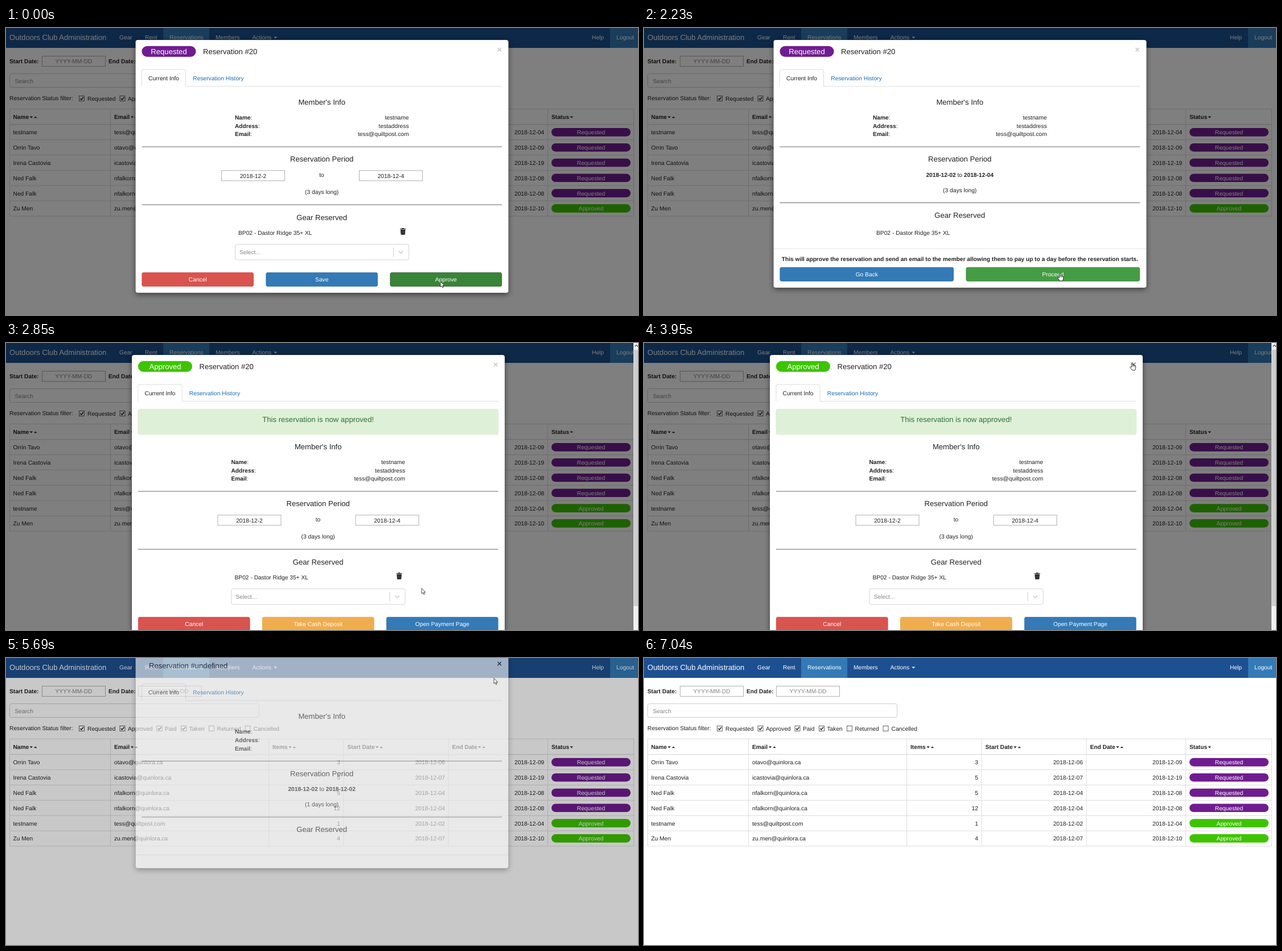
An HTML page that plays this animation: 1110x505 px, repeating every 7410 ms.

```html
<!DOCTYPE html>
<html lang="en">
<head>
<meta charset="utf-8">
<title>Reservations</title>
<style>
  html, body { margin: 0; width: 100%; height: 100%; overflow: hidden; background: #fff; }
  svg { display: block; width: 1110px; height: 505px; }
  text { font: 10.24px "Liberation Sans", Arial, sans-serif; fill: #222; text-rendering: geometricPrecision; white-space: pre; }
  .b { font-weight: 700; font-size: 10.2px; }
  .h { font-size: 13.1px; }
  .w { fill: #fff; }
  .mute { fill: #868686; }
  .link { fill: #1a6cb4; }
  .ok { fill: #2f7034; }
  .mid { text-anchor: middle; }
  .end { text-anchor: end; }
  .x { font-size: 15px; font-weight: 700; }
  .panel { fill: #fff; stroke: rgba(0,0,0,.2); stroke-width: .7; filter: drop-shadow(0 3.5px 5px rgba(0,0,0,.5)); }
</style>
</head>
<body>
<svg id="stage" viewBox="0 0 1110 505" xmlns="http://www.w3.org/2000/svg"></svg>
<script>
const LOOP = 7410;
const PURPLE = '#701c91', GREEN = '#3dc400', BLUE = '#337ab7', RED = '#d9534f', ORANGE = '#f0ad4e';

// drawing helpers
const text = (x, y, s, cls = '') => `<text x="${x}" y="${y}" class="${cls}">${s}</text>`;
const box = (x, y, w, h, fill, stroke = 'none', r = 0, more = '') =>
  `<rect x="${x}" y="${y}" width="${w}" height="${h}" rx="${r}" fill="${fill}" stroke="${stroke}" ${more}/>`;
const path = (d, fill, stroke = 'none', sw = 1) =>
  `<path d="${d}" fill="${fill}" stroke="${stroke}" stroke-width="${sw}"/>`;
const group = (id, body, attrs = '') => `<g id="${id}" ${attrs}>${body}</g>`;
const bold = s => `<tspan class="b">${s}</tspan>`;
const down = (x, y) => path(`M${x} ${y}h5.6l-2.8 2.9z`, '#222');
const up = (x, y) => path(`M${x} ${y + 2.9}h5.6l-2.8 -2.9z`, '#222');
const pill = (x, y, w, h, status, base, cls) =>
  box(x, y, w, h, status === 'Approved' ? GREEN : PURPLE, 'none', h / 2) +
  text(x + w / 2, base, status, `w mid ${cls}`);
const button = (x, y, w, label, fill, edge = fill, id = '') =>
  box(x + .4, y + .4, w - .8, 24.2, fill, edge, 2.8, `stroke-width=".8" ${id && `id="${id}"`}`) +
  text(x + w / 2, y + 16, label, 'w mid');

// page
function navbar() {
  const items = [[199, 'Gear'], [244, 'Rent'], [287, 'Reservations'], [368, 'Members'], [432.5, 'Actions'], [1029, 'Help'], [1072, 'Logout']];
  return box(0, 0, 1110, 35, '#1d5091') + box(276, 0, 81, 35, BLUE) + box(1061, 0, 49, 35, BLUE) +
    text(6, 21, 'Outdoors Club Administration', 'h w') +
    items.map(([x, s]) => text(x, 20, s, 'w')).join('') +
    path('M470.5 15.5h5.6l-2.8 2.9z', '#fff');
}

function filters() {
  const checks = [[128, 143, 'Requested'], [199.5, 214, 'Approved'], [264.5, 279, 'Paid'], [307, 321.5, 'Taken'], [356, 370.5, 'Returned'], [419.5, 434.5, 'Cancelled']];
  const date = (x, lx, label) => text(lx, 62, label, 'b') +
    box(x, 49.5, 111, 18, '#fff', '#b0b0b0') + text(x + 55.5, 62, 'YYYY-MM-DD', 'mute mid');
  return date(63.5, 6, 'Start Date:') + date(232.5, 180, 'End Date:') +
    box(6.5, 80.5, 438, 24, '#fff', '#ccc', 3) + text(15.5, 96.5, 'Search', 'mute') +
    text(6, 127, 'Reservation Status filter:') +
    checks.map(([x, lx, s], i) => box(x + .5, 119.5, 9, 9, '#fff', '#555', 0, 'stroke-width=".9"') +
      (i < 4 ? path(`M${x + 2.4} 124l2 2.2l3.6 -4.6`, 'none', '#111', 1.4) : '') + text(lx, 128, s)).join('');
}

function grid() {
  const heads = [[12.5, 'Name', 41.5], [190, 'Email', 218.8], [468, 'Items', 496.3], [599.5, 'Start Date', 649], [783.5, 'End Date', 829], [958, 'Status', 990.5]];
  let lines = '';
  for (const x of [6.5, 183.5, 461.5, 593, 777, 951.5, 1102.5]) lines += `M${x} 142.5V331`;
  for (let i = 0; i < 8; i++) lines += `M6.5 ${i ? 142.8 + 26.9 * i : 142.5}H1102.5`;
  return path(lines, 'none', '#ddd') + path('M6.5 169.6H1102.5', 'none', '#ddd', 1.4) +
    heads.map(([x, s, cx], i) => text(x, 160, s, 'b') + down(cx, 155.6) + (i < 5 ? up(cx + 7.4, 155.4) : '')).join('');
}

const guest = ['testname', 'tess@quiltpost.com', 1, '02', '04'];
const people = [
  ['Orrin Tavo', 'otavo@quinlora.ca', 3, '06', '09'],
  ['Irena Castovia', 'icastovia@quinlora.ca', 5, '07', '19'],
  ['Ned Falk', 'nfalkorn@quinlora.ca', 5, '04', '08'],
  ['Ned Falk', 'nfalkorn@quinlora.ca', 12, '04', '08'],
  ['Zu Men', 'zu.men@quinlora.ca', 4, '07', '10']
];
const rows = (list, requested) => list.map(([name, mail, n, from, to], i) => {
  const y = 187.3 + 26.8 * i;
  return text(12.5, y, name) + text(190, y, mail) + text(587, y, n, 'end') +
    text(771, y, '2018-12-' + from, 'end') + text(945.3, y, '2018-12-' + to, 'end') +
    pill(958, y - 11.2, 139, 14.6, i < requested ? 'Requested' : 'Approved', y, '');
}).join('');

// dialog
const rule = y => path(`M238.5 ${y}H871`, 'none', '#666');
const shell = (bottom, title, titleX, status) =>
  box(227.5, 21, 655, bottom - 21, '#fff', 'none', 4, 'class="panel"') +
  (status ? pill(238.5, 31.8, 95, 19, status, 45.8, 'h') : '') +
  text(titleX, 45.7, title, 'h') +
  path('M238.5 102.5V76q0 -3 3 -3h71q3 0 3 3V102.5H871', 'none', '#ddd') +
  text(250, 91.7, 'Current Info') + text(328.3, 91.7, 'Reservation History', 'link');
const closeX = fill => `<text x="866.6" y="43" class="x mid" style="fill:${fill}">×</text>`;
const member = values => text(554.7, 134.6, "Member's Info", 'h mid') +
  ['Name', 'Address', 'Email'].map((s, i) => text(402, 161 + 14.6 * i, bold(s) + ':') +
    text(707.5, 161 + 14.6 * i, values[i] || '', 'end')).join('') +
  rule(209) + text(554.7, 235.3, 'Reservation Period', 'h mid');
const guestInfo = member(['testname', 'testaddress', guest[1]]);
const gear = text(408, 363.7, 'BP02 - Dastor Ridge 35+ XL');

const editor = () => {
  const field = (x, s) => box(x, 250.8, 111, 18, '#fff', '#b0b0b0') + text(x + 55.5, 263.6, s, 'mid');
  return guestInfo + field(378.5, '2018-12-2') + field(620.5, '2018-12-4') +
    text(554.5, 261.8, 'to', 'mid') + text(554.7, 292.3, '(3 days long)', 'mid') + rule(311) +
    text(554.7, 337.6, 'Gear Reserved', 'h mid') + gear +
    path('M692 354v-1.1h3l.6 -.9h3l.6 .9h3v1.1zM692.8 354.8h8.6l-.6 8q-.1 1 -1 1h-5.4q-.9 0 -1 -1z', '#222') +
    path('M695.2 356.5v5.5M697.1 356.5v5.5M699 356.5v5.5', 'none', '#777', .5) +
    box(402.5, 380.5, 305, 27.5, '#fff', '#d4d4d4', 3) + text(410, 398, 'Select...', 'mute') +
    path('M680.5 386.5V402.5', 'none', '#ccc') + path('M690 392.6l3.6 3.6l3.6 -3.6', 'none', '#ccc', 1.5);
};
const review = (to, days) => text(554.7, 262, `${bold('2018-12-02')} to ${bold('2018-12-' + to)}`, 'mid') +
  text(554.7, 288.8, `(${days} days long)`, 'mid') + rule(307.5) + text(554.7, 333.8, 'Gear Reserved', 'h mid');
const footLine = y => path(`M228 ${y}H882`, 'none', '#e5e5e5');

const edit = shell(466, 'Reservation #20', 346, 'Requested') + closeX('#ccc') + editor() +
  button(238.5, 430, 196.5, 'Cancel', RED, '#d43f3a') + button(456.5, 430, 196.5, 'Save', BLUE, '#2e6da4') +
  button(674.5, 430, 196.5, 'Approve', '#398439', '#255625');

const confirm = shell(457, 'Reservation #20', 346, 'Requested') + closeX('#ccc') + guestInfo + review('04', 3) + gear +
  footLine(388) + text(554.8, 410, 'This will approve the reservation and send an email to the member allowing them to pay up to a day before the reservation starts.', 'b mid') +
  button(238.5, 420.8, 305.5, 'Go Back', BLUE, '#2e6da4') + button(565.5, 420.8, 305.5, 'Proceed', '#5cb85c', '#4cae4c', 'proceed');

const approved = shell(518, 'Reservation #20', 346, 'Approved') + group('closeMark', closeX('#ccc')) +
  box(238.5, 116.5, 632.5, 44.5, '#dff0d8', '#d6e9c6', 3, 'stroke-width=".7"') +
  text(554.7, 138.6, 'This reservation is now approved!', 'h ok mid') +
  `<g transform="translate(0 52)">${editor()}` + button(238.5, 430, 196.5, 'Cancel', RED, '#d43f3a') +
  button(456.5, 430, 196.5, 'Take Cash Deposit', ORANGE, '#eea236') + button(674.5, 430, 196.5, 'Open Payment Page', BLUE, '#2e6da4') + '</g>';

const closing = shell(397.5, 'Reservation #undefined', 251, '') + closeX('#444') + member([]) + review('02', 1) + footLine(374);

const scrollbar = box(1102, 0, 8, 505, '#f1f1f1') + box(1102.5, 12, 7.5, 451, '#cdcdcd') +
  path('M1104.5 6.2l2.6 -2.6l2.6 2.6', 'none', '#505050', 1.3);

const arrow = path('M.5 .5V10.2L2.7 8.2L4.2 11.6L5.8 10.9L4.3 7.6H7.2z', '#fff', '#222', .8);
const hand = path('M3.4 8.6V1.6q0 -1.1 1 -1.1t1 1.1V5q.9 -.6 1.7 .2q.9 -.5 1.6 .4q1.7 -.3 1.8 1.3V10L9.3 14H4.6L1 9.4q-.7 -1.2 .4 -1.6q.9 -.2 2 .8z', '#fff', '#222', .9) +
  path('M5.4 5.2V7.6M7.1 5.4V7.6M8.7 5.8V7.6', 'none', '#222', .7);

const stage = document.getElementById('stage');
stage.innerHTML = box(0, 0, 1110, 505, '#fff') + navbar() + filters() + grid() +
  group('before', rows([guest, ...people], 5)) +
  group('after', rows([...people.slice(0, 4), guest, people[4]], 4)) +
  box(0, 0, 1110, 505, '#000', 'none', 0, 'id="shade"') +
  group('edit', edit) + group('confirm', confirm) +
  group('approved', approved, 'transform="translate(-6.5 0)"') +
  group('closing', closing, 'transform="translate(0 -27.6)" opacity=".6"') +
  group('scrollbar', scrollbar) + group('arrow', arrow) + group('hand', hand);

const $ = id => document.getElementById(id);
const show = (id, on) => $(id).setAttribute('display', on ? 'inline' : 'none');
const at = (steps, t) => steps.filter(s => s[0] <= t).pop();

// start time, visible dialog, backdrop opacity
const scenes = [[0, 'edit', .5], [120, 'confirm', .5], [2850, 'approved', .5], [5690, 'closing', .215], [5810, '', 0]];
// start time, fill, border
const proceed = [[0, '#5cb85c', '#4cae4c'], [1490, '#449d44', '#398439'], [2480, '#398439', '#255625'], [2600, '#449d44', '#398439']];
// start time, pointer, x, y
const glide = (start, from, to, eased) => eased.map((p, i) =>
  [start + 120 * i, 'arrow', from[0] + (to[0] - from[0]) * p, from[1] + (to[1] - from[1]) * p]);
const pointer = [
  [0, 'arrow', 762.5, 445.5], [1370, 'hand', 750, 441.5], [1490, 'hand', 739, 435],
  [1610, 'hand', 727, 431], [2230, 'hand', 726, 431], [2850, 'arrow', 729.5, 431],
  ...glide(3470, [729.5, 431], [856.5, 35], [.12, .42, .75, .95]),
  [3950, 'hand', 853, 34], [5570, 'arrow', 856.5, 35],
  ...glide(6560, [856.5, 35], [1044.5, 489], [.1, .35, .7, 1]),
  [7040, '', 0, 0]
];

function draw(t) {
  const [, scene, dim] = at(scenes, t);
  for (const id of ['edit', 'confirm', 'approved', 'closing']) show(id, id === scene);
  show('before', t < 2850);
  show('after', t >= 2850);
  show('scrollbar', scene === 'approved');
  $('shade').setAttribute('opacity', dim);

  const [, fill, edge] = at(proceed, t);
  $('proceed').setAttribute('fill', fill);
  $('proceed').setAttribute('stroke', edge);
  $('closeMark').setAttribute('style', t >= 3950 ? 'filter:brightness(.62)' : '');

  const [, kind, x, y] = at(pointer, t);
  for (const id of ['arrow', 'hand']) {
    show(id, id === kind);
    $(id).setAttribute('transform', `translate(${x} ${y})`);
  }
}

const origin = performance.now();
function tick() {
  draw((performance.now() - origin) % LOOP);
  requestAnimationFrame(tick);
}
draw(0);
requestAnimationFrame(tick);
</script>
</body>
</html>
```
